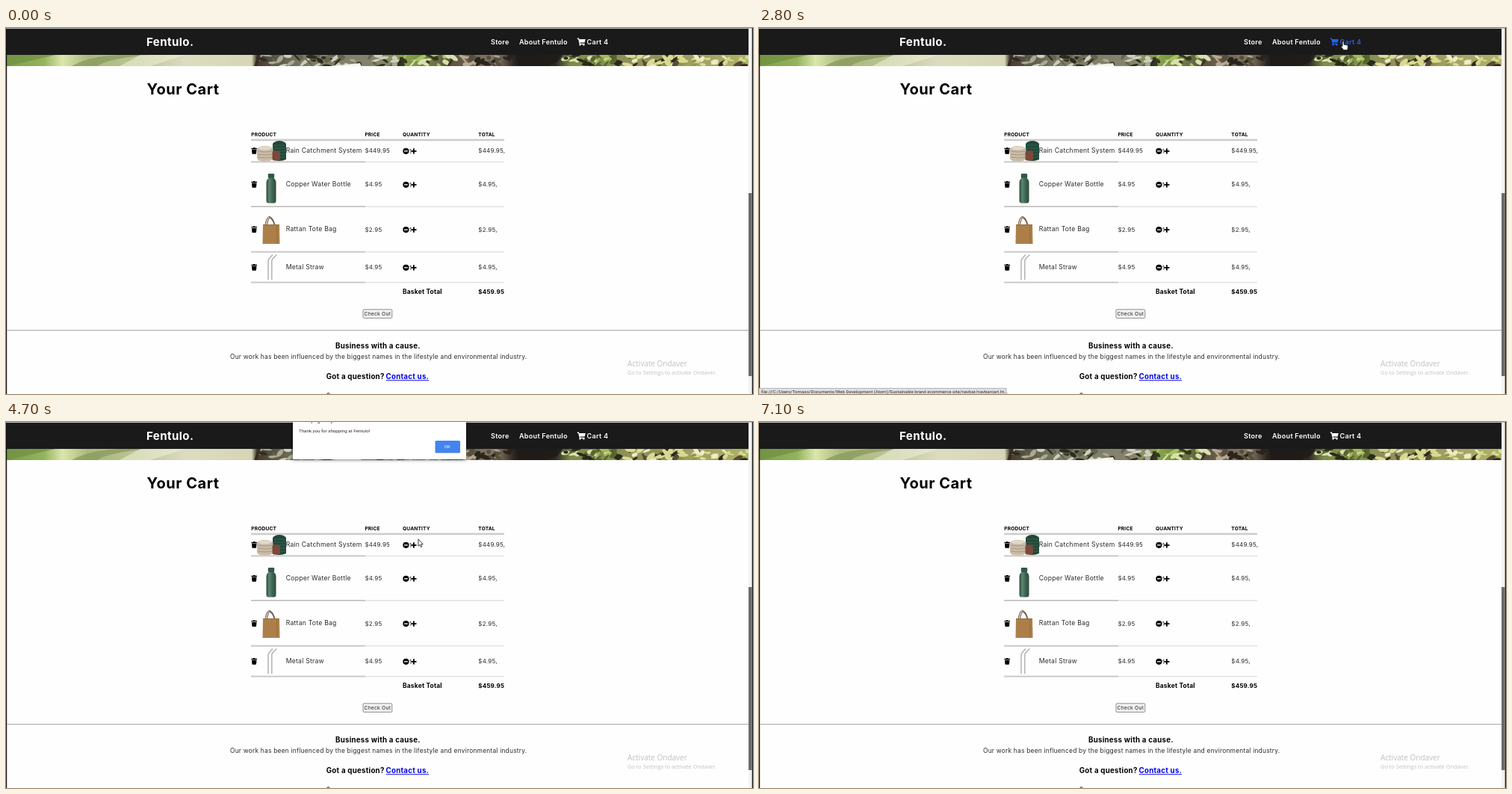
An HTML page for the animation above (7.2 s loop, 1000 by 490 pixels).

```html
<!DOCTYPE html>
<html lang="en">
<head>
<meta charset="utf-8">
<title>Cart</title>
<style>
  html, body { margin: 0; width: 100%; height: 100%; overflow: hidden; background: #fefefe; }
  svg { display: block; width: 100vw; height: 100vh; }
  text { font: 8.4px Inter, sans-serif; letter-spacing: .027em; fill: #2b2b2b; white-space: pre; }
  .b { font-weight: 700; fill: #000; }
  .logo { font-size: 15.1px; font-weight: 700; fill: #fff; }
  .nav text { font-size: 9.1px; font-weight: 600; fill: inherit; }
  .title { font-size: 20px; }
  .head text { font-size: 6.6px; }
  .name { font-size: 8.65px; }
  .price { font-size: 8px; }
  .foot { font-size: 9.7px; }
  .small { font-size: 6.8px; }
  .os { font-family: "Open Sans", sans-serif; fill: #c0c0c0; letter-spacing: 0; }
  .ui { font: 6.2px Roboto, sans-serif; letter-spacing: 0; }
</style>
</head>
<body>
<svg viewBox="0 0 1000 490">
  <defs>
    <linearGradient id="photo">
      <stop offset="0" stop-color="#7f9f4a"/>
      <stop offset=".05" stop-color="#94b35c"/>
      <stop offset=".075" stop-color="#dbe6ac"/>
      <stop offset=".11" stop-color="#a9b87c"/>
      <stop offset=".18" stop-color="#bcc596"/>
      <stop offset=".24" stop-color="#dcdcc0"/>
      <stop offset=".33" stop-color="#d6d6b6"/>
      <stop offset=".337" stop-color="#463b2e"/>
      <stop offset=".4" stop-color="#7b7d66"/>
      <stop offset=".5" stop-color="#85836c"/>
      <stop offset=".54" stop-color="#86a24a"/>
      <stop offset=".6" stop-color="#5d5340"/>
      <stop offset=".66" stop-color="#8a7a68"/>
      <stop offset=".685" stop-color="#27221d"/>
      <stop offset=".74" stop-color="#2c2821"/>
      <stop offset=".76" stop-color="#7c8c48"/>
      <stop offset=".88" stop-color="#959360"/>
      <stop offset="1" stop-color="#adb468"/>
    </linearGradient>
    <linearGradient id="glaze">
      <stop offset="0" stop-color="#2c4b3d"/>
      <stop offset=".3" stop-color="#5d8570"/>
      <stop offset=".6" stop-color="#3f6753"/>
      <stop offset="1" stop-color="#2b4a3c"/>
    </linearGradient>
    <clipPath id="band"><rect x="1" y="36" width="993" height="15"/></clipPath>
    <filter id="soft"><feGaussianBlur stdDeviation=".7"/></filter>
    <filter id="shade" x="-10%" y="-20%" width="120%" height="150%">
      <feDropShadow dx="0" dy="1" stdDeviation="2" flood-opacity=".45"/>
    </filter>
    <path id="trash" d="M0 1.2h2.3L2.8.3h2l.5.9h2.3v1.2H0zM.5 3h6.6l-.5 5.4q-.1.8-.9.8H1.9q-.8 0-.9-.8z"/>
    <g id="qty">
      <circle cx="4.4" r="4.1"/>
      <path d="M2 0h4.8" stroke="#fff" stroke-width="1.3"/>
      <path d="M11.3 0h7.2M14.9-3.6v7.2" stroke="#000" stroke-width="1.8"/>
    </g>
  </defs>

  <rect width="1000" height="490" fill="#fefefe"/>
  <g clip-path="url(#band)">
    <rect x="1" y="36" width="993" height="15" fill="url(#photo)"/>
    <path d="M0 52L36 43 66 36H0z" fill="#6f9040" opacity=".7"/>
    <path d="M86 52Q110 38 150 36h40Q130 42 122 52z" fill="#87985a" opacity=".7"/>
    <path d="M180 36h60l-50 16h-40z" fill="#eeeed8" opacity=".6"/>
    <g id="leaves" filter="url(#soft)"></g>
    <path d="M434 52v-1l40-4 2 5z" fill="#f5f2ec"/>
    <path d="M334 52l5-16" stroke="#3a2c20" stroke-width="4"/>
    <path d="M683 36h62l-6 9-16 7h-38z" fill="#1d1a17" opacity=".8"/>
  </g>
  <rect y="1" width="994" height="35" fill="#1a1a1a"/>
  <rect width="1000" height="1" fill="#bcbcbc"/>
  <rect y="1" width="1.2" height="489" fill="#111"/>
  <rect x="994" y="1" width="5" height="489" fill="#f3f3f3"/>
  <rect x="994" y="221" width="4.5" height="245" fill="#6c6c6c"/>
  <rect x="998.7" width="1.3" height="490" fill="#1a1a1a"/>

  <text class="logo" x="188" y="23.5">Fentulo.</text>
  <g class="nav" fill="#fff">
    <text x="649" y="22">Store</text>
    <text x="687" y="22">About Fentulo</text>
    <g id="cart">
      <path d="M764.8 13.6h2.1l.5 1.4h8.4l-1.2 4.6h-6l.3 1.1h5.5v1.2h-6.5l-1.8-7h-1.3z"/>
      <circle cx="768.6" cy="22.4" r="1.2"/><circle cx="773.4" cy="22.4" r="1.2"/>
      <text x="777.6" y="22">Cart 4</text>
    </g>
  </g>

  <text class="b title" x="188.5" y="89">Your Cart</text>
  <g class="head">
    <text class="b" x="328.3" y="145.4">PRODUCT</text>
    <text class="b" x="480.4" y="145.4">PRICE</text>
    <text class="b" x="531" y="145.4">QUANTITY</text>
    <text class="b" x="632.3" y="145.4">TOTAL</text>
  </g>
  <rect x="328" y="148.6" width="339" height="2.6" fill="#cdcdcd"/>
  <g id="rows"></g>

  <!-- water tanks -->
  <path d="M357 155q3-4 9-4t9 4v21q-9 4-18 0z" fill="#21483a"/>
  <path d="M358 157h16M358 161h16M358 165h16M358 169h16M358 173h16" stroke="#39664f" stroke-width=".9"/>
  <path d="M336 162q2-4 10.500-4t11 4v13q-2 3.500-11 3.500T336 175z" fill="#c9bba6"/>
  <path d="M337 165q10 2 20 0M337 169q10 2 20 0M337 173q10 2 20 0" fill="none" stroke="#a39580" stroke-width=".9"/>
  <ellipse cx="346.500" cy="161" rx="8.500" ry="2.300" fill="#e4dac9"/>
  <rect x="356.500" y="164.500" width="10.500" height="13" rx="2.500" fill="#7d4839"/>
  <!-- bottle -->
  <rect x="350.800" y="195" width="8.400" height="6" rx="1.200" fill="#31584a"/>
  <path d="M351.500 201h7q3 2 3 5v25q0 3.500-3 3.500h-7q-3 0-3-3.500v-25q0-3 3-5z" fill="url(#glaze)"/>
  <!-- tote bag -->
  <path d="M347 264Q349 253 352.500 252.500 357 253 360 264M349.500 263Q351 255 353 254q4 2 6 9" fill="none" stroke="#73604f" stroke-width="1.200"/>
  <path d="M344 263h22l.5 26h-23z" fill="#ad7f48"/>
  <path d="M344.500 263.500h21.500M362.500 264l.5 25" stroke="#936a3c" stroke-width="1"/>
  <!-- straws -->
  <path d="M351 337v-25q0-2 1.500-3.500l4.500-5M355.800 337v-25q0-2 1.500-3.500l5-5" fill="none" stroke="#adadad" stroke-width="1.400"/>

  <text class="b" x="531" y="356">Basket Total</text>
  <text class="b price" x="632.3" y="356">$459.95</text>
  <rect x="478" y="376.8" width="38.8" height="11.6" rx="1.2" fill="#f0f0f0" stroke="#858585" stroke-width=".9"/>
  <text class="small" x="479.5" y="385">Check Out</text>

  <rect x="1" y="404" width="993" height="1.4" fill="#b9b9b9"/>
  <text class="b foot" x="441" y="429.3">Business with a cause.</text>
  <text x="300" y="442.7">Our work has been influenced by the biggest names in the lifestyle and environmental industry.</text>
  <text class="b foot" x="428.8" y="470.3">Got a question?</text>
  <text class="b foot" x="508.6" y="470.3" style="fill:#00e;text-decoration:underline">Contact us.</text>
  <circle cx="431.5" cy="490.8" r="2" fill="none" stroke="#222"/>
  <text class="os" x="832" y="453.3" style="font-size:10px">Activate Ondaver</text>
  <text class="os" x="832" y="464" style="font-size:7.4px">Go to Settings to activate Ondaver.</text>

  <g id="status">
    <rect y="482.3" width="331" height="9" fill="#dfe1e4" stroke="#a5a5a5" stroke-width=".8"/>
    <text class="ui" x="3" y="488.7" style="font-size:6.1px">file:///C:/Users/Tomaso/Documents/Web Development (Atom)/Sustainable brand ecommerce site/navbar/navbarcart.ht...</text>
  </g>

  <g id="dialog">
    <rect x="384" y="-12" width="232" height="62" fill="#fff" filter="url(#shade)"/>
    <text class="ui" x="392" y="-.3" style="font-size:7.5px">This page says</text>
    <text class="ui" x="392" y="14">Thank you for shopping at Fentulo!</text>
    <rect x="574.5" y="25" width="33.5" height="16.5" rx="1.5" fill="#4384ee"/>
    <text class="ui" x="586.8" y="35.4" style="fill:#fff">OK</text>
  </g>

  <g id="pointer" fill="#fff" stroke="#111" stroke-width=".8" stroke-linejoin="round">
    <path id="arrow" d="M0 0V9.300L2.100 7.400 3.500 10.700 5 10 3.600 6.900H6.300z"/>
    <path id="hand" d="M-1 1q1-1.500 2 0v4l4.500 1q1.200.4 1 2l-.7 4.500h-5L-2.600 8.500q-.6-1.500.6-1.500l1 .8z"/>
  </g>
</svg>
<script>
const LOOP = 7200, STEP = 100;
const $ = id => document.getElementById(id);
const show = (id, on) => $(id).style.display = on ? '' : 'none';
const clamp = v => Math.min(1, Math.max(0, v));

const products = [
  ['Rain Catchment System', '$449.95', 164, 179.3],
  ['Copper Water Bottle', '$4.95', 209, 239],
  ['Rattan Tote Bag', '$2.95', 269.3, 299.7],
  ['Metal Straw', '$4.95', 320, 340.6]
];
$('rows').innerHTML = products.map(([name, price, y, line]) => `
  <rect x="328" y="${line - 1}" width="153" height="2" fill="#c9c9c9"/>
  <rect x="481" y="${line - .5}" width="186" height="1.2" fill="#dcdcdc"/>
  <use href="#trash" x="328.4" y="${y - 4.4}"/>
  <text class="name" x="374.7" y="${y + 2.9}">${name}</text>
  <text class="price" x="480.4" y="${y + 3.4}">${price}</text>
  <use href="#qty" x="531" y="${y + .8}"/>
  <text class="price" x="539.8" y="${y + 3.6}">1</text>
  <text class="price" x="632.3" y="${y + 3.4}">${price},</text>`).join('');

// Blurred foliage: [from, to, count, colours]
let seed = 11;
const rnd = () => (seed = seed * 16807 % 2147483647) / 2147483647;
const foliage = [
  [340, 530, 50, ['#2f2c22', '#a9aa95', '#62664a', '#cfccbd']],
  [525, 600, 20, ['#a4c45c', '#333a20', '#d9e0ad']],
  [600, 683, 24, ['#2a251c', '#b8a892', '#55503b']],
  [745, 830, 32, ['#272b19', '#a2bb58', '#dce0b4', '#58662d']],
  [830, 994, 64, ['#30291c', '#d9da90', '#87974a', '#efebc8', '#5a4b33']]
];
$('leaves').innerHTML = foliage.map(([from, to, count, tones]) =>
  Array.from({ length: count }, () => {
    const x = from + rnd() * (to - from), y = 36 + rnd() * 15;
    return `<ellipse rx="${3 + rnd() * 5}" ry="${1 + rnd() * 2.5}" fill="${tones[rnd() * tones.length | 0]}"
      transform="translate(${x} ${y}) rotate(${rnd() * 120 - 60})"/>`;
  }).join('')).join('');

// Pointer stops: [time, x, y]
const path = [
  [700, -10, 180], [1100, 687.5, 101], [1300, 687.5, 101], [1700, 782, 17],
  [3050, 782, 17], [3500, 424, 380.5], [3600, 424, 380.5], [3900, 492, 381],
  [4400, 492, 381], [4900, 584.5, 35], [5500, 584.5, 35], [6000, 1010, 240]
];
function pointerAt(t) {
  const i = path.findIndex(stop => stop[0] >= t);
  if (i < 1) return null;
  const [t0, x0, y0] = path[i - 1], [t1, x1, y1] = path[i];
  const k = (t - t0) / (t1 - t0), e = k * k * (3 - 2 * k);
  return [x0 + (x1 - x0) * e, y0 + (y1 - y0) * e];
}

function draw(now) {
  const t = Math.floor(now % LOOP / STEP) * STEP;
  const at = pointerAt(t), hover = t >= 1700 && t < 3100;
  show('pointer', at);
  if (at) $('pointer').setAttribute('transform', `translate(${at})`);
  show('hand', hover);
  show('arrow', !hover);
  $('cart').setAttribute('fill', hover ? '#2460f0' : '#fff');
  show('status', t >= 1700 && t < 3700);

  const open = t < 5600 ? clamp((t - 4100) / 400) : 0;
  show('dialog', open);
  $('dialog').setAttribute('opacity', open);
  $('dialog').setAttribute('transform', `translate(0 ${-10.7 * (1 - open)})`);
  requestAnimationFrame(draw);
}
requestAnimationFrame(draw);
</script>
</body>
</html>
```
